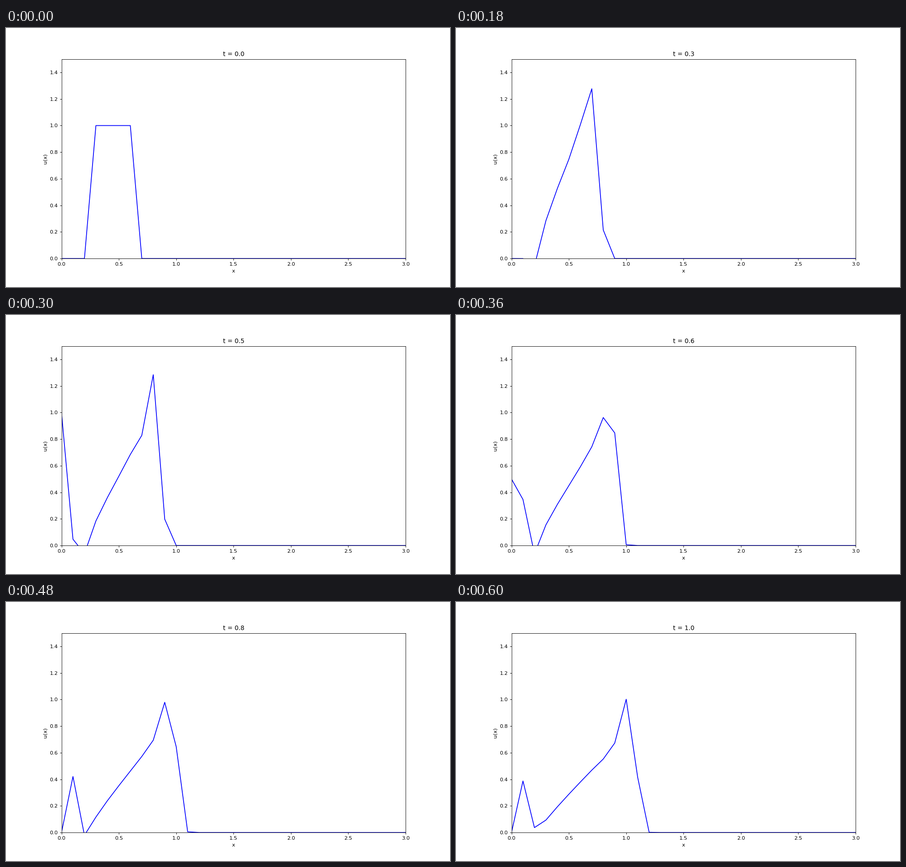
Recreate the animation shown at these times as a matplotlib script. Size 980 px wide and 572 px high, loop 660 ms.

```python
import numpy as np
import matplotlib.pyplot as plt
from matplotlib.animation import FuncAnimation

DX = DT = 0.1
STEPS = 11
DPI = 980 / 12
x = np.linspace(0, 3, 31)


def flux(u):
    return u * u / 2


def inflow(t):
    """Triangular pulse entering at x = 0."""
    return max(0.0, 1 - abs(t - 0.5) / 0.2)


def advance(u, t):
    """One Richtmyer (two-step Lax-Wendroff) step of Burgers' equation."""
    r = DT / DX
    half = (u[1:] + u[:-1]) / 2 - r / 2 * np.diff(flux(u))
    new = u.copy()
    new[1:-1] -= r * np.diff(flux(half))
    new[0] = inflow(t)
    return new


states = [np.where((x > 0.25) & (x < 0.65), 1.0, 0.0)]
for n in range(1, STEPS):
    states.append(advance(states[-1], round(n * DT, 6)))

# 12 inches wide, 980 x 572 pixels
fig, ax = plt.subplots(figsize=(12, 7.0041), dpi=DPI)
line, = ax.plot(x, states[0], color="blue", lw=1.5)
ax.set(xlim=(0, 3), ylim=(0, 1.5), xlabel="x", ylabel="u(x)")
title = ax.set_title("t = 0.0")


def draw(n):
    line.set_ydata(states[n])
    title.set_text(f"t = {n * DT:.1f}")
    return line, title


anim = FuncAnimation(fig, draw, frames=STEPS, interval=60, repeat=True,
                     repeat_delay=0, blit=False)
plt.show()
```
